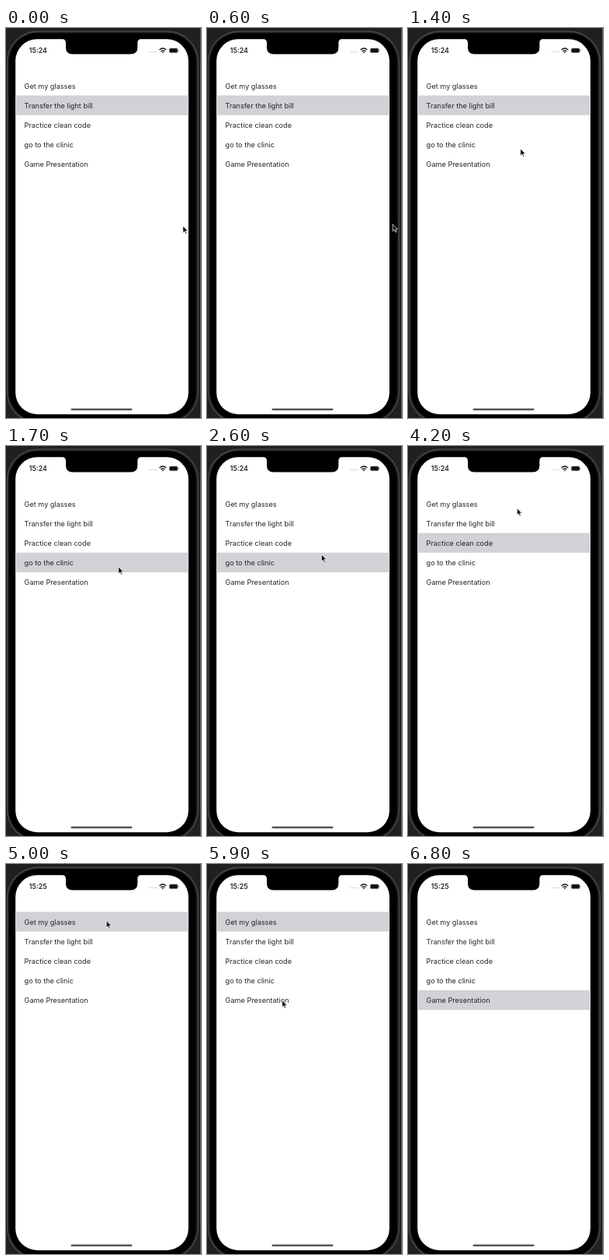
An HTML page that plays this animation: 251x500 px, repeating every 9800 ms.

```html
<!DOCTYPE html>
<html lang="en">
<head>
<meta charset="utf-8">
<title>Selectable list</title>
<style>
  html, body { margin: 0; width: 100%; height: 100%; overflow: hidden; background: #202021; }
  svg { display: block; width: 100vw; height: 100vh; }
  text { font: 9.15px Inter, Roboto, sans-serif; fill: #262626; }
  #clock { font-size: 8.8px; font-weight: 600; }
</style>
</head>
<body>
<svg viewBox="0 0 251 500">
  <!-- phone body and screen -->
  <path d="M250.5 0V500" stroke="#666"/>
  <rect x="1.8" y="4.5" width="245.2" height="501" rx="39" fill="#111" stroke="#434345" stroke-width="1.8"/>
  <rect x="4.5" y="7" width="239.5" height="496" rx="36" fill="#000"/>
  <rect x="12.2" y="14.2" width="222.6" height="481" rx="28" fill="#fff"/>
  <path d="M72 13.5Q77 14.5 77 19V25Q77 33.6 85.5 33.6H160.5Q169.3 33.6 169.3 25V19Q169.3 14.5 174 13.5Z"/>

  <!-- status bar -->
  <text id="clock" x="29.8" y="32.2"></text>
  <path d="M184.5 30.6H194.5" stroke="#ccc" stroke-dasharray="2 .7"/>
  <path d="M197.4 28.1Q201.8 23.9 206.2 28.1M199.2 30.1Q201.8 27.6 204.4 30.1" fill="none" stroke="#111" stroke-width="1.3"/>
  <path d="M200.6 31.1Q201.8 30 203 31.1L201.8 32.5Z"/>
  <rect x="210.2" y="26" width="10.8" height="5.7" rx="1.7" fill="#111" stroke="#888" stroke-width=".7"/>
  <path d="M222.1 27.7V30" stroke="#888" stroke-width=".8"/>

  <rect id="mark" x="12.2" width="222.6" height="25.2" fill="#d1d1d6"/>
  <g id="list"></g>
  <rect x="83.5" y="487.7" width="79" height="2.5" rx="1.2" fill="#555"/>
  <path id="cursor" d="M0 0V9L2.1 7.1 3.5 10.4 5 9.7 3.6 6.5H6.4Z" fill="#111" stroke="#fff" stroke-width=".7" stroke-linejoin="round"/>
</svg>
<script>
const LOOP = 9800, STEP = 100, ROW = 25.1, TOP = 61.4;
const el = id => document.getElementById(id);
const tasks = ['Get my glasses', 'Transfer the light bill', 'Practice clean code',
  'go to the clinic', 'Game Presentation'];

tasks.forEach((task, i) => {
  const text = document.createElementNS('http://www.w3.org/2000/svg', 'text');
  text.setAttribute('x', 23.6);
  text.setAttribute('y', TOP + ROW * i + 16.1);
  text.textContent = task;
  el('list').append(text);
});

// Taps select a row at a given time.
const taps = [
  { at: 0, row: 1 }, { at: 1700, row: 3 }, { at: 3400, row: 2 },
  { at: 5000, row: 0 }, { at: 6300, row: 4 }
];

// The pointer glides to (x, y) between two times and rests there.
const glides = [
  { from: 0, to: 300, x: 202.5, y: 257 },
  { from: 400, to: 600, x: 239, y: 251.5 },
  { from: 1000, to: 1000, x: 195, y: 178 },
  { from: 1000, to: 1400, x: 144.7, y: 154.7 },
  { from: 2500, to: 3100, x: 151, y: 117.5 },
  { from: 4100, to: 4200, x: 140.3, y: 79.7 },
  { from: 4200, to: 4700, x: 129.2, y: 72.7 },
  { from: 5300, to: 5900, x: 96.7, y: 174.7 },
  { from: 6600, to: 6700, x: 150.5, y: 169 }
];
const pointerShown = t => t < 700 || (t >= 1100 && t < 6800);
const easeOut = k => 1 - (1 - k) ** 3;

function pointer(t) {
  let x = 227.7, y = 253.7;
  for (const g of glides.filter(g => g.from <= t)) {
    const k = t >= g.to ? 1 : easeOut((t - g.from) / (g.to - g.from));
    x += (g.x - x) * k;
    y += (g.y - y) * k;
  }
  return [x, y];
}

function draw(now) {
  const t = Math.floor(now % LOOP / STEP) * STEP;
  el('mark').setAttribute('y', TOP + ROW * taps.findLast(tap => tap.at <= t).row);
  el('clock').textContent = t < 4500 ? '15:24' : '15:25';
  el('cursor').style.display = pointerShown(t) ? '' : 'none';
  el('cursor').setAttribute('transform', `translate(${pointer(t)})`);
}

const start = performance.now();
function tick() {
  draw(performance.now() - start);
  requestAnimationFrame(tick);
}
tick();
</script>
</body>
</html>
```
